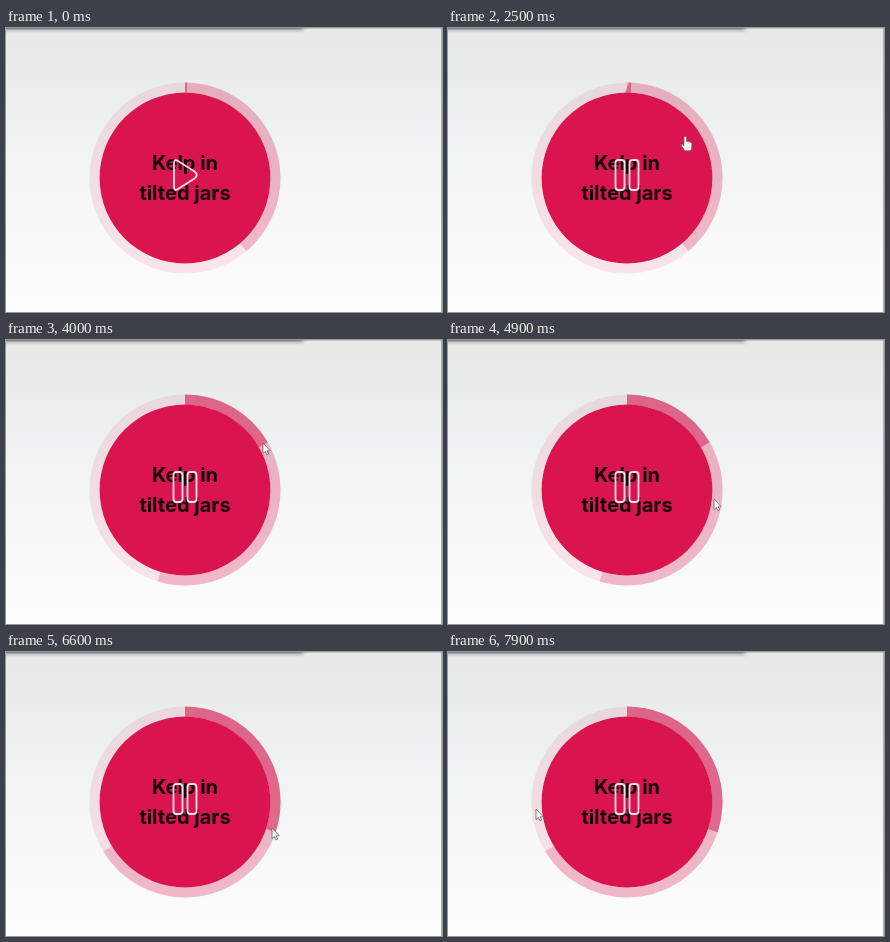
Recreate the animation shown at these times as an HTML page. Size 436x284 px, loop 8 s.

```html
<!DOCTYPE html>
<html lang="en">
<head>
<meta charset="utf-8">
<title>Round player</title>
<style>
  html, body { margin: 0; width: 100%; height: 100%; overflow: hidden; }
  .stage {
    position: relative; width: 436px; height: 284px; overflow: hidden;
    background: linear-gradient(#e8e9e6, #ebeeed 25%, #eff2f2 36%, #f4f5f4 55%, #fafafa 78%, #fcfcfc);
  }
  .tab {
    position: absolute; left: -10px; top: -9px; width: 306px; height: 9px;
    background: #666; box-shadow: 0 0 4px 1px #555;
  }
  .edge { position: absolute; right: 0; top: 0; width: 1px; height: 100%; background: #aeb0af; }
  .top { position: absolute; left: 0; top: 0; width: 100%; height: 1px; background: #c3c5c3; }
  svg { position: absolute; left: 0; top: 0; }
  .ring circle { fill: none; stroke: #d3164f; stroke-width: 10.2; }
  .disc { fill: #d9144f; }
  .title { font: 700 20px Inter, sans-serif; text-anchor: middle; fill: #12060a; }
  .icon { fill: none; stroke: #fff; stroke-opacity: .88; stroke-width: 1.8; stroke-linejoin: round; }
  .cursor { fill: #fff; stroke: #666; stroke-width: .8; stroke-linejoin: round; }
</style>
</head>
<body>
<div class="stage">
  <div class="top"></div>
  <div class="tab"></div>
  <div class="edge"></div>
  <svg width="436" height="284" viewBox="0 0 436 284">
    <g class="ring" transform="translate(179 150) rotate(-90)">
      <circle r="90.4" stroke-opacity=".1"/>
      <circle id="buffer" r="90.4" pathLength="360" stroke-opacity=".21"/>
      <circle id="progress" r="90.4" pathLength="360" stroke-opacity=".48"/>
    </g>
    <circle class="disc" cx="179" cy="150" r="85.4"/>
    <g class="title">
      <text x="179" y="142">Kelp in</text>
      <text x="179" y="171.500">tilted jars</text>
    </g>
    <g class="icon">
      <path id="play" d="M168 135.500Q168 130.500 172 133L188.500 143.500Q193 147 188.500 150.500L172 161Q168 163.500 168 158.500Z"/>
      <g id="pause">
        <rect x="167.500" y="132" width="9" height="30" rx="3"/>
        <rect x="181.500" y="132" width="9" height="30" rx="3"/>
      </g>
    </g>
    <g class="cursor" id="cursor">
      <path id="hand" d="M-1.300 1.300Q-1.300 0 0 0T1.300 1.300V5Q2.800 4.200 3.300 5.500Q4.800 4.900 5.200 6.200Q6.600 5.800 6.600 7.400V10Q6.600 12 5.200 14.300H-.5Q-1.400 12.500-3.900 9Q-4 7.400-2.600 8L-1.300 9.200Z"/>
      <path id="arrow" d="M0 0V10.500L2.400 8.400L3.900 11.900L5.700 11.100L4.200 7.800H7.300Z"/>
    </g>
  </svg>
</div>
<script>
  const LOOP = 8000, STEP = 100;
  const APPEAR = 100, PLAY = 1100, SEEK = 3000, LOAD = 3900, SEEK_AGAIN = 6000, SWING = 6600;
  const $ = id => document.getElementById(id);
  const show = (id, on) => $(id).setAttribute('visibility', on ? 'visible' : 'hidden');

  // Each move eases from the last place to x, y, bowed sideways on the way
  const entry = [138, 211];
  const moves = [
    { from: 100, to: 600, x: 193, y: 150, bow: 20 },
    { from: 700, to: 1100, x: 168, y: 159, bow: 0 },
    { from: 2200, to: 2900, x: 257, y: 103, bow: -6 },
    { from: 4500, to: 4900, x: 266, y: 159, bow: 0 },
    { from: 4900, to: 5200, x: 266, y: 176, bow: 190 }
  ];
  const easeOut = p => 1 - (1 - p) ** 3;

  // Three half swings below the disc, from its right side to its left
  function swingAt(t) {
    const p = (t - SWING) / (7900 - SWING);
    const angle = 3 * Math.PI * p;
    const side = Math.cos(angle), depth = 85 - 35 * p;
    return [177 + 89 * side, 166.5 + 9.5 * side + depth * Math.abs(Math.sin(angle))];
  }

  function pointerAt(t) {
    if (t >= SWING) return swingAt(t);
    let [x, y] = entry;
    for (const m of moves) {
      if (t <= m.from) break;
      const p = Math.min(1, (t - m.from) / (m.to - m.from));
      const dx = m.x - x, dy = m.y - y;
      const side = m.bow * Math.sin(Math.PI * p) / Math.hypot(dx, dy);
      x += dx * easeOut(p) - dy * side;
      y += dy * easeOut(p) + dx * side;
    }
    return [x, y];
  }

  // Arc ends in degrees clockwise from the top
  const progressAt = t => t >= SEEK_AGAIN ? 108.5 : t >= SEEK ? 60 : t >= 2000 ? 2.6 : 1.3;
  const bufferAt = t => t >= SEEK_AGAIN ? 239 : t >= LOAD ? 196.7 : 140;

  function setArc(id, degrees) {
    $(id).setAttribute('stroke-dasharray', `${degrees} ${360 - degrees}`);
  }

  function draw(t) {
    const [x, y] = pointerAt(t);
    const overDisc = Math.hypot(x - 179, y - 150) < 86;
    $('cursor').setAttribute('transform', `translate(${x} ${y})`);
    show('hand', t >= APPEAR && overDisc);
    show('arrow', t >= APPEAR && !overDisc);
    show('play', t < PLAY);
    show('pause', t >= PLAY);
    setArc('progress', progressAt(t));
    setArc('buffer', bufferAt(t));
  }

  const start = performance.now();
  function tick() {
    const t = (performance.now() - start) % LOOP;
    draw(Math.floor(t / STEP) * STEP);
    requestAnimationFrame(tick);
  }
  tick();
</script>
</body>
</html>
```
